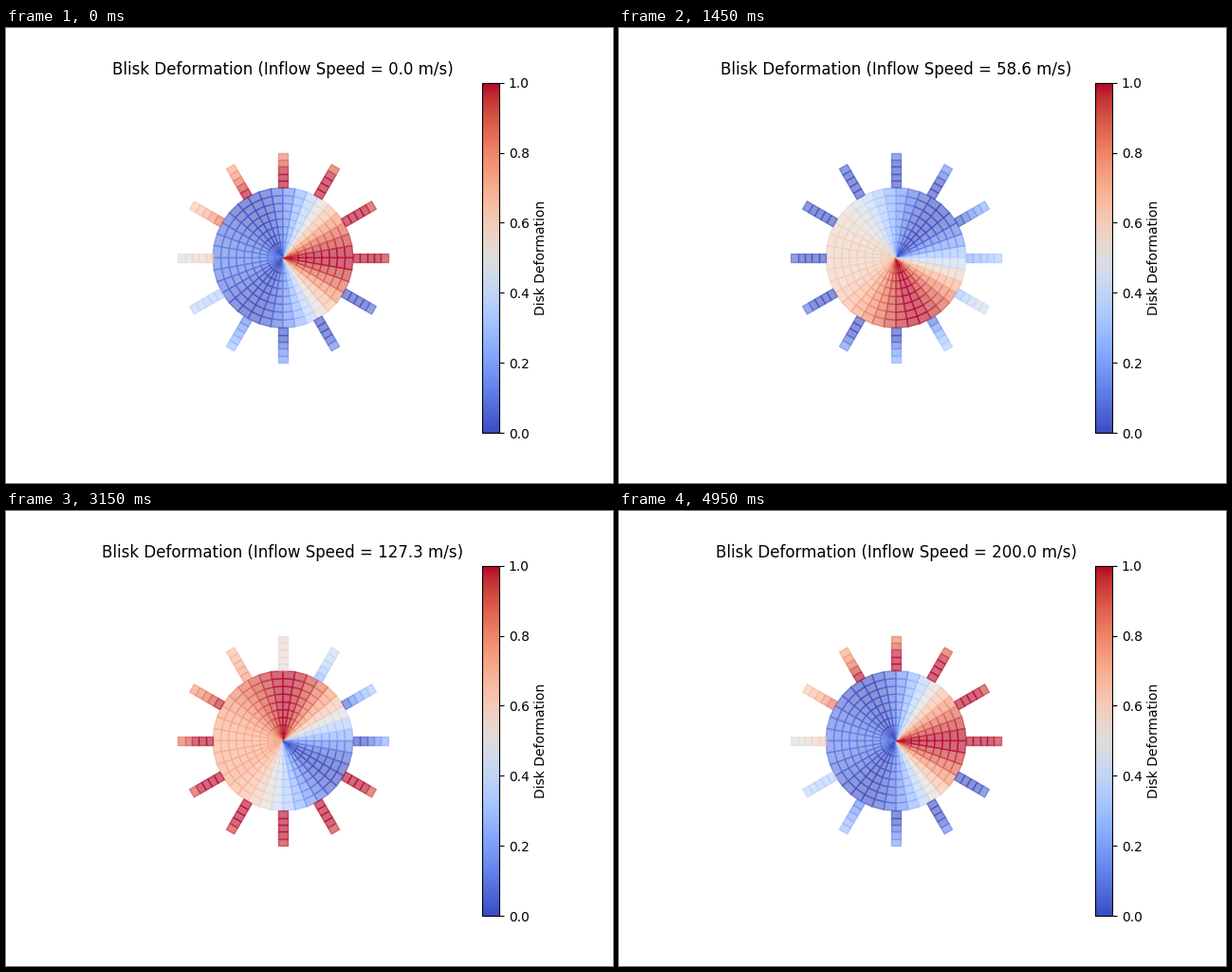
Recreate the animation shown at these times as a matplotlib script. Size 640x480 px, loop 5000 ms.

```python
import numpy as np
import matplotlib.pyplot as plt
from matplotlib.animation import FuncAnimation
from matplotlib.cm import ScalarMappable
from matplotlib.collections import PolyCollection
from matplotlib.colors import Normalize

FRAMES = 100
INTERVAL = 50
SECTORS, RINGS = 36, 9
BLADES, SEGMENTS = 12, 5
BLADE_LENGTH, BLADE_WIDTH = 0.5, 0.13
BLADE_LAG = np.radians(14)
TIP_LAG = np.radians(5)
MAX_SPEED = 200


def polar(r, angle):
    return r * np.cos(angle), r * np.sin(angle)


def disk_cells():
    radii = np.linspace(0, 1, RINGS + 1)
    angles = np.linspace(0, 2 * np.pi, SECTORS + 1)
    return [
        [polar(r0, a0), polar(r1, a0), polar(r1, a1), polar(r0, a1)]
        for r0, r1 in zip(radii[:-1], radii[1:])
        for a0, a1 in zip(angles[:-1], angles[1:])
    ]


def blade_cells():
    steps = np.linspace(1, 1 + BLADE_LENGTH, SEGMENTS + 1)
    half = BLADE_WIDTH / 2
    cells = []
    for angle in np.arange(BLADES) * 2 * np.pi / BLADES:
        c, s = np.cos(angle), np.sin(angle)
        turn = np.array([[c, s], [-s, c]])
        for r0, r1 in zip(steps[:-1], steps[1:]):
            box = np.array([(r0, -half), (r1, -half), (r1, half), (r0, half)])
            cells.append(box @ turn)
    return cells


def disk_values(phase):
    """Two travelling waves, scaled to 0..1 and equal along each sector."""
    angle = (np.arange(SECTORS) + 0.5) * 2 * np.pi / SECTORS
    wave = np.cos(angle + phase) + 0.5 * np.cos(2 * angle + phase)
    wave = (wave - wave.min()) / (wave.max() - wave.min())
    return np.tile(wave, RINGS)


def blade_values(phase):
    """Each blade lags its neighbour; the swing fades towards the tip."""
    blade = np.arange(BLADES)[:, None]
    seg = np.arange(SEGMENTS)[None, :]
    lag = blade * BLADE_LAG + seg / (SEGMENTS - 1) * TIP_LAG
    wave = 0.5 + 0.83 ** seg * np.cos(phase + lag)
    return np.clip(wave, 0, 1).ravel()


fig, ax = plt.subplots(figsize=(6.4, 4.8), dpi=100)
norm = Normalize(0, 1)
cells = PolyCollection(
    disk_cells() + blade_cells(),
    cmap="coolwarm", norm=norm, alpha=0.6, linewidths=1, edgecolors="face",
)
ax.add_collection(cells)
ax.set_xlim(-2.5, 2.5)
ax.set_ylim(-2.5, 2.5)
ax.set_aspect("equal")
ax.axis("off")
title = ax.set_title("")
fig.colorbar(ScalarMappable(norm, "coolwarm"), ax=ax, label="Disk Deformation")


def update(frame):
    progress = frame / (FRAMES - 1)
    phase = 2 * np.pi * progress
    cells.set_array(np.concatenate([disk_values(phase), blade_values(phase)]))
    speed = MAX_SPEED * progress
    title.set_text(f"Blisk Deformation (Inflow Speed = {speed:.1f} m/s)")
    return cells, title


anim = FuncAnimation(fig, update, frames=FRAMES, interval=INTERVAL,
                     repeat=True, repeat_delay=0, blit=False)
plt.show()
```
